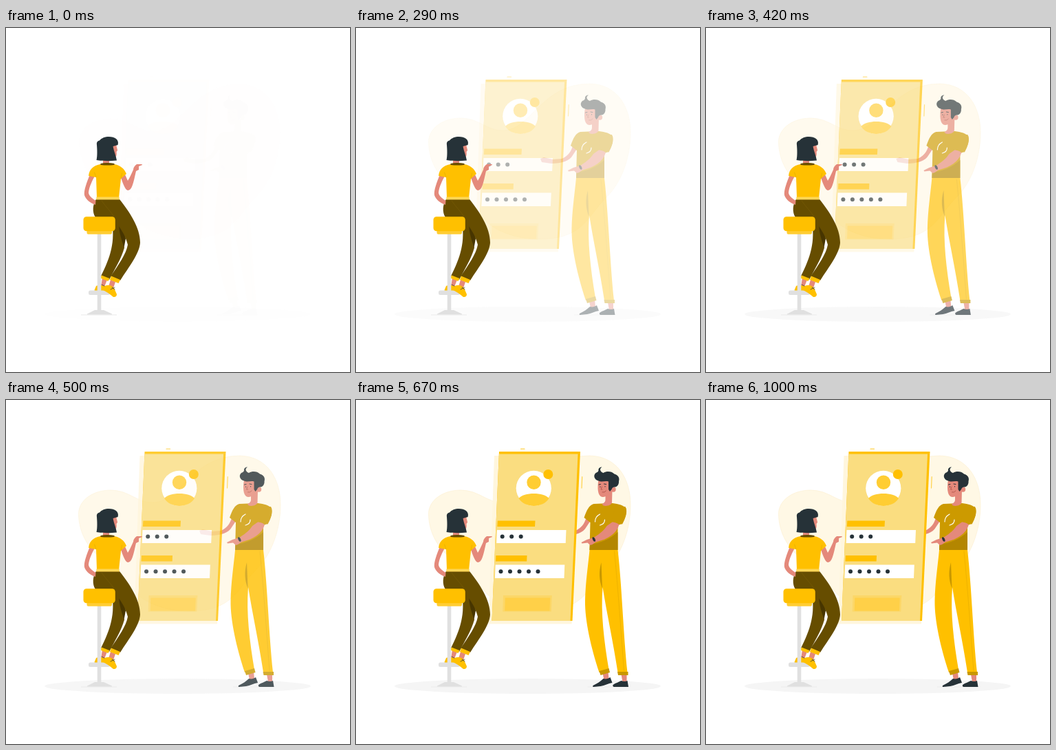
An HTML page for the animation above (1040 ms loop, 500 px wide and 500 px high).

```html
<!DOCTYPE html>
<html lang="en">
<head>
<meta charset="utf-8">
<title>Login scene</title>
<style>
html, body { margin: 0; width: 100%; height: 100%; overflow: hidden; background: #fff; }
svg { display: block; width: 100vw; height: 100vh; }
.y { fill: #ffc000; }
.amber { fill: #ffcd33; }
.skin { fill: #e4897b; }
.ink { fill: #263238; }
.olive { fill: #664d00; }
.grey { fill: #e0e0e0; }
.line { fill: none; stroke-linecap: round; }
</style>
</head>
<body>
<svg viewBox="0 0 500 500">
  <g class="fade">
    <path fill="#fff8e5" stroke="#fcefcf" stroke-width=".6" d="M152 131C180 131 190 150 215 149C255 147 270 81 340 81C380 82 399 115 399 152C399 190 385 225 365 245C340 270 335 292 300 303C262 312 222 305 196 287C176 270 172 252 150 238C122 222 105.500 195 105.500 165C106 145 127 131 152 131Z"/>
    <ellipse cx="249.5" cy="416" rx="193.5" ry="11" fill="#f5f5f5"/>
  </g>

  <!-- standing man -->
  <g class="fade slide">
    <path fill="#ebebeb" d="M336 416.5H395V417.5H336Z"/>
    <path class="skin" d="M334 171C332 180 326 187 318 190L305 191L292 188L287 190L289 195L303 197C318 197 330 193 334 185L340 176Z"/>
    <path class="skin" d="M358 397L366 395L367 405L360 407ZM385 399H393V410H387Z"/>
    <path class="ink" d="M344 415C350 412 355 409 359 405C363 406 366 405 369 403L372 411C366 412 361 415 355 416L345 417Q343 417 344 415ZM373 414C377 411 382 410 385 408Q390 410 394 408L395.500 417H374Q372 416 373 414Z"/>
    <path class="y" d="M339 218H380C386 270 388 340 394 396H380C373 350 364 310 358 272C355 310 360 350 367 392L353 396C341 360 332 320 332.500 292C333 265 337 240 339 218Z"/>
    <path fill="#c99800" d="M356 236C352 250 353 262 357.500 274ZM353 394L367 390L368.500 396L355 400ZM379.500 395H395L395 400H380.500Z"/>
    <path class="line" stroke="#e5ac00" stroke-width=".6" d="M375 220C380 270 385 340 389 394"/>
    <path fill="#cc9a00" d="M345 151C338 153 335 160 331 171L340 178L339 218H380V182L386 180C391 172 394 164 392 157C386 152 378 150 369 150Z"/>
    <path fill="#b38600" d="M339.400 210C355 208 369 202 380 192V218H339Z"/>
    <path class="line" stroke="#fff" stroke-width="1.200" d="M347 177C347 171 350 168 354 166M354 182C358 181 361 178 361 174"/>
    <path class="skin" d="M362 138L372 130L371.500 149C371 154 358 156 357 151Q362 149 362 145Z"/>
    <path class="skin" d="M352 116C350 128 351 137 355 140C360 143 368 138 370 132L372 115Z"/>
    <circle class="skin" cx="373.500" cy="130" r="3.700"/>
    <path class="ink" d="M357 97.500C353 100 354 104 359 106C364 103 371 103.500 375 107.500C381 109 383 114 381.500 118C382 123 379 126 376 126.500Q372 126 371 130L368.500 133L366.500 130V118.500C361 117 357 120 352 117.500C346 116 344 110 347.500 106.500C350 104.500 351.500 105 352 102C351.500 99.500 354 97.500 357 97.500Z"/>
    <path class="line" stroke="#263238" stroke-width="1" d="M352.500 123L355 122.500M360 122L363 122.500M354.500 126V126.500M361.500 125.500V126"/>
    <path class="line" stroke="#a84f43" stroke-width=".8" d="M357 126L355.500 130H357.500M357.500 134Q361 135 363 132"/>
    <path class="skin" d="M364 183C360 190 350 197 345 200L335 203L327 207L328 208.500L336 207.500L340 211C345 210 346 207 350 206C365 202 378 195 382 181L374 176Z"/>
    <path fill="#cc9a00" d="M376 155H391C394 164 391 172 386.500 180.500L371 177Z"/>
    <ellipse class="ink" cx="345.300" cy="202.500" rx="1.800" ry="3.500" transform="rotate(-25 345.300 202.500)"/>
  </g>

  <!-- phone -->
  <g class="fade slide">
    <path fill="#fff6dd" d="M200.500 81H322L313 325.500H192Z"/>
    <path class="y" d="M207.500 75H325.500L314 321H197Z"/>
    <path fill="#fadd80" d="M207.400 78.500H322L311 321H197Z"/>
    <path class="line" stroke="#ffd24a" stroke-width="1.200" d="M239 71.200H244.500M328.200 111.500L327.500 128"/>
    <circle cx="257.800" cy="128.300" r="25.600" fill="#fff"/>
    <circle class="amber" cx="258" cy="119.800" r="10.200"/>
    <path class="amber" d="M236 143C243 133.500 273 133.500 280 143C271 157.500 245 157.500 236 143Z"/>
    <circle class="y" cx="278.800" cy="108" r="7"/>
    <path class="y" d="M205.300 175.500H260L259.500 184H204.800ZM202.900 226H248L247.700 234.500H202.500Z"/>
    <path fill="#fff" d="M204.500 189H305L304.200 208H203.700ZM202.200 239.500H302.800L302 259H201.400Z"/>
    <g class="ink" id="dots"></g>
    <path fill="#fcd768" d="M213.500 284H284.300L283.300 307.500H212.700Z"/>
    <path fill="#ffd048" d="M216.300 287.500H281.800L281 306.500H215.700Z"/>
  </g>

  <!-- seated woman -->
  <path fill="#ebebeb" d="M109 416.500H161V417.500H109Z"/>
  <path class="skin" d="M140 363L147 366L143 376L138 376ZM152 366L159 369L156 378L149 376Z"/>
  <path class="y" d="M128.500 381L131 375C136 372 142 375 147 376L146 382H129Z"/>
  <path fill="#473500" d="M155 280H170L174 306L171 322Z"/>
  <path class="olive" d="M153 278C160 310 151 335 138 360.500L150 366C158 350 168 335 172 319C166 305 164 292 164 282Z"/>
  <path class="olive" d="M131 249H165C180 268 195 290 195 312C194 328 178 348 166 367L152 361C163 345 175 328 177 315C173 300 166 290 156 278L130 275C125 268 126 256 131 249Z"/>
  <path class="line" stroke="#7a5d08" stroke-width=".6" d="M139 251C145 260 151 265 157 274"/>
  <path class="y" d="M139 359.500L150.500 364L148.500 368L137 363.500ZM153 360.500L166 366L163.500 371L151 366Z"/>
  <path class="grey" d="M132.700 299H138.300V410H142L154 415.500V416.500H118V415.500L129 410H132.700Z"/>
  <rect class="grey" x="120" y="381.500" width="31" height="6.500" rx="2.500"/>
  <path class="y" d="M141 377C146 372 153 373 157 378L161 387C161 390 159 391.500 156 391C152 388 148 384 141 381Z"/>
  <path class="line" stroke="#263238" stroke-width=".7" d="M139 373L143 375M152 380L158 377M154 377L158 380"/>
  <rect class="amber" x="117.500" y="293" width="36.500" height="6.700" rx="2"/>
  <rect class="y" x="112.500" y="274.300" width="46.300" height="20.900" rx="4.500"/>
  <path class="skin" d="M122 213C117 225 113 236 114 243C116 250 124 255 130 257L130.500 251C124 247 120 243 120 239C121 230 126 221 129 215Z"/>
  <path class="skin" d="M167 217C170 227 174 236 177 236C183 236 185 226 189 208L193 206L193 201L198 199L197.500 198L190 198C187 200 185 203 185 206C182 213 179 219 177 222L173 213Z"/>
  <path class="skin" d="M141 190H150V199H141Z"/>
  <path class="y" d="M137 198H157C165 199 172 204 175 212L167 219L164 247H132L131 217L120 215C121 206 126 200 137 198Z"/>
  <path class="olive" d="M137.500 197Q147 195 157.500 197V199Q147 200 137.500 199Z"/>
  <path class="line" stroke="#dfa900" stroke-width=".6" d="M131 217L128.500 210M167 219L168.500 211"/>
  <path fill="#ffd656" d="M131.500 245.500H164.500L165 249.500H131Z"/>
  <path class="skin" d="M154 171L160 169C161 174 162 176 162 178L160.500 180C161 184 161 187 158 188Z"/>
  <path class="ink" d="M136 163.500C141 156.500 155 156.500 160 161C163 163.500 163.500 167 162.500 170L155.500 172C157 180 160 186 161 192.500C152 193.500 140 193.500 131.500 192C133 186 132.500 176 132 170C131.500 166 133 164 136 163.500Z"/>
</svg>
<script>
const LOOP = 1040, DURATION = 1000, LEAD = 30, SHIFT = -30;

const bezier = (a, b, s) => 3 * a * s * (1 - s) ** 2 + 3 * b * s * s * (1 - s) + s ** 3;

// Overshooting ease: find the curve parameter for x by bisection.
function ease(x) {
  let lo = 0, hi = 1;
  for (let i = 0; i < 24; i++) {
    const mid = (lo + hi) / 2;
    if (bezier(0.36, 0.5, mid) < x) lo = mid; else hi = mid;
  }
  return bezier(-0.01, 1.38, hi);
}

function dotRow(x, y, count) {
  let row = '';
  for (let i = 0; i < count; i++) row += `<circle cx="${x + i * 13.5}" cy="${y}" r="3"/>`;
  return row;
}
document.getElementById('dots').innerHTML = dotRow(212.2, 198.5, 3) + dotRow(210, 249.2, 5);

const fading = document.querySelectorAll('.fade');
const sliding = document.querySelectorAll('.slide');
const start = performance.now();

function draw() {
  const t = (performance.now() - start) % LOOP;
  const p = ease(Math.min(1, (t + LEAD) / DURATION));
  const opacity = Math.max(0, Math.min(1, p));
  fading.forEach(g => g.setAttribute('opacity', opacity));
  sliding.forEach(g => g.setAttribute('transform', `translate(${SHIFT * (1 - p)} 0)`));
  requestAnimationFrame(draw);
}
draw();
</script>
</body>
</html>
```
